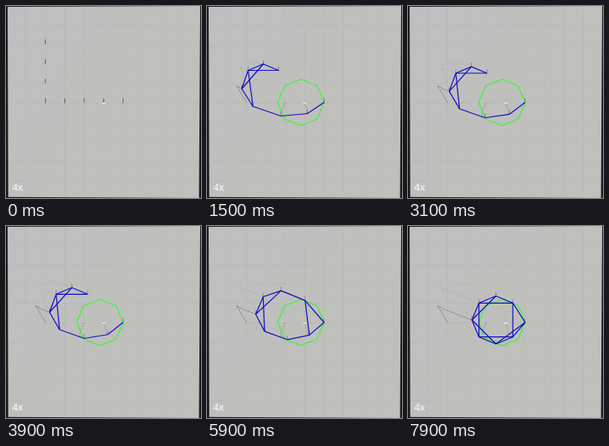
Animation, 244 px wide and 240 px high, one loop 8 s. Source, as an HTML page with a canvas:

```html
<!DOCTYPE html>
<html lang="en">
<head>
<meta charset="utf-8">
<title>Ring formation</title>
<style>
  html, body { margin: 0; width: 100%; height: 100%; overflow: hidden; background: #bfc0bc; }
  canvas { display: block; width: 244px; height: 240px; }
  .speed {
    position: absolute; left: 8px; top: 219px;
    font: 600 12px/16px "Open Sans", "Noto Sans", sans-serif; color: #f0f0f0;
  }
</style>
</head>
<body>
<canvas id="stage" width="244" height="240"></canvas>
<div class="speed">4x</div>
<script>
const ctx = document.getElementById('stage').getContext('2d');
const LOOP = 8000, STEP = 100;
const SWING = 900, HOOK = 1500, CLOSE = 5100, END = 7900;
const RANGE = 48;   // robots nearer than this are linked
const ANCHOR = [146, 120];

// The curved chain that the robots form before closing into a ring.
const hook = [ANCHOR, [125, 134], [92, 137], [57, 125], [43, 103], [51, 80], [70, 72], [89, 80]];
const trailColors = ['', '#777c', '#777c', '#c9a18aaa', '#555d', '#a99bb8aa', '#cfa78caa', ''];

const mix = (a, b, u) => a.map((v, k) => v + (b[k] - v) * u);
const octagon = (x, y, r) => hook.map((_, i) =>
  [x + r * Math.cos(i * Math.PI / 4), y + r * Math.sin(i * Math.PI / 4)]);

const target = octagon(117, 120, 29);
const goal = octagon(109.5, 117, 30);
goal[0] = ANCHOR;

// An L-shaped row: five robots across, three more going up.
const start = hook.map((_, i) => [146 - 24.3 * Math.min(i, 4), 120 - 24.6 * Math.max(i - 4, 0)]);
// Robots far from the anchor overshoot to the left first.
const swing = hook.map(([x, y], i) => i ? [x - 3.6 * Math.max(0, i - 2.2), y - 4] : ANCHOR);

// Slow approach, then the free end of the chain closes first.
function progress(i, t) {
  if (t < CLOSE) return 0.41 * ((t - HOOK) / (CLOSE - HOOK)) ** 0.75;
  const s = Math.min(1, (t - CLOSE) / (END - CLOSE));
  const lag = 0.21 + 0.95 * (7 - i);
  return 0.41 + 0.59 * s / (s + lag * (1 - s));
}

function pose(i, t) {
  if (t < SWING) return mix(start[i], swing[i], t / SWING);
  if (t < HOOK) return mix(swing[i], hook[i], (t - SWING) / (HOOK - SWING));
  return mix(hook[i], goal[i], progress(i, t));
}

function line(points, color, width, closed) {
  ctx.beginPath();
  points.forEach(([x, y]) => ctx.lineTo(x + 0.5, y + 0.5));
  if (closed) ctx.closePath();
  ctx.strokeStyle = color;
  ctx.lineWidth = width;
  ctx.stroke();
}

function drawFloor() {
  ctx.fillStyle = '#1b1b1b';
  ctx.fillRect(0, 0, 244, 240);
  const shade = ctx.createLinearGradient(0, 40, 150, 130);
  shade.addColorStop(0, '#bebfc0');
  shade.addColorStop(1, '#bfc0bb');
  ctx.fillStyle = shade;
  ctx.beginPath();
  [[2, 1], [243, 0], [241.5, 240], [2.8, 238.7]].forEach(p => ctx.lineTo(...p));
  ctx.fill();
  for (let i = 1; i < 10; i++) {
    const c = Math.round(i * 24.3);
    line([[c, 1], [c, 238]], '#a9aaa840', 1);
    line([[3, c - 1], [241, c - 1]], '#a9aaa840', 1);
  }
}

function drawTrail(i, t) {
  const past = [];
  for (let s = 0; s <= t; s += STEP) past.push(pose(i, s));
  ctx.setLineDash([3, 1]);
  line(past, trailColors[i], 0.7);
  ctx.setLineDash([]);
}

function drawRobot([x, y], i, t) {
  line([[x, y - 5], [x, y]], t ? '#55555599' : '#555', 0.9);
  if (t > HOOK) return;
  line([[x, y - 2], [x, y + 1]], i % 3 === 2 ? '#7a9a90' : '#b44', 1.1);
  if (i === 5 || i === 6) line([[x - 4, y + 1], [x - 1, y + 1]], '#6d6', 1);
}

function draw(t) {
  const robots = hook.map((_, i) => pose(i, t));
  drawFloor();
  if (t) {
    robots.forEach((_, i) => trailColors[i] && drawTrail(i, t));
    line(target, '#3cf53c', 1.3, true);
  }
  robots.forEach((r, i) => drawRobot(r, i, t));
  line([[120, 121], [124, 121]], '#f2f2ee', 1.3);
  if (!t) return;
  robots.forEach((a, i) => robots.slice(i + 1).forEach(b => {
    if (Math.hypot(a[0] - b[0], a[1] - b[1]) < RANGE) line([a, b], '#0b0bc4', 1.2);
  }));
}

const begin = performance.now();
function tick() {
  const t = (performance.now() - begin) % LOOP;
  draw(Math.floor(t / STEP) * STEP);
  requestAnimationFrame(tick);
}
tick();
</script>
</body>
</html>
```
